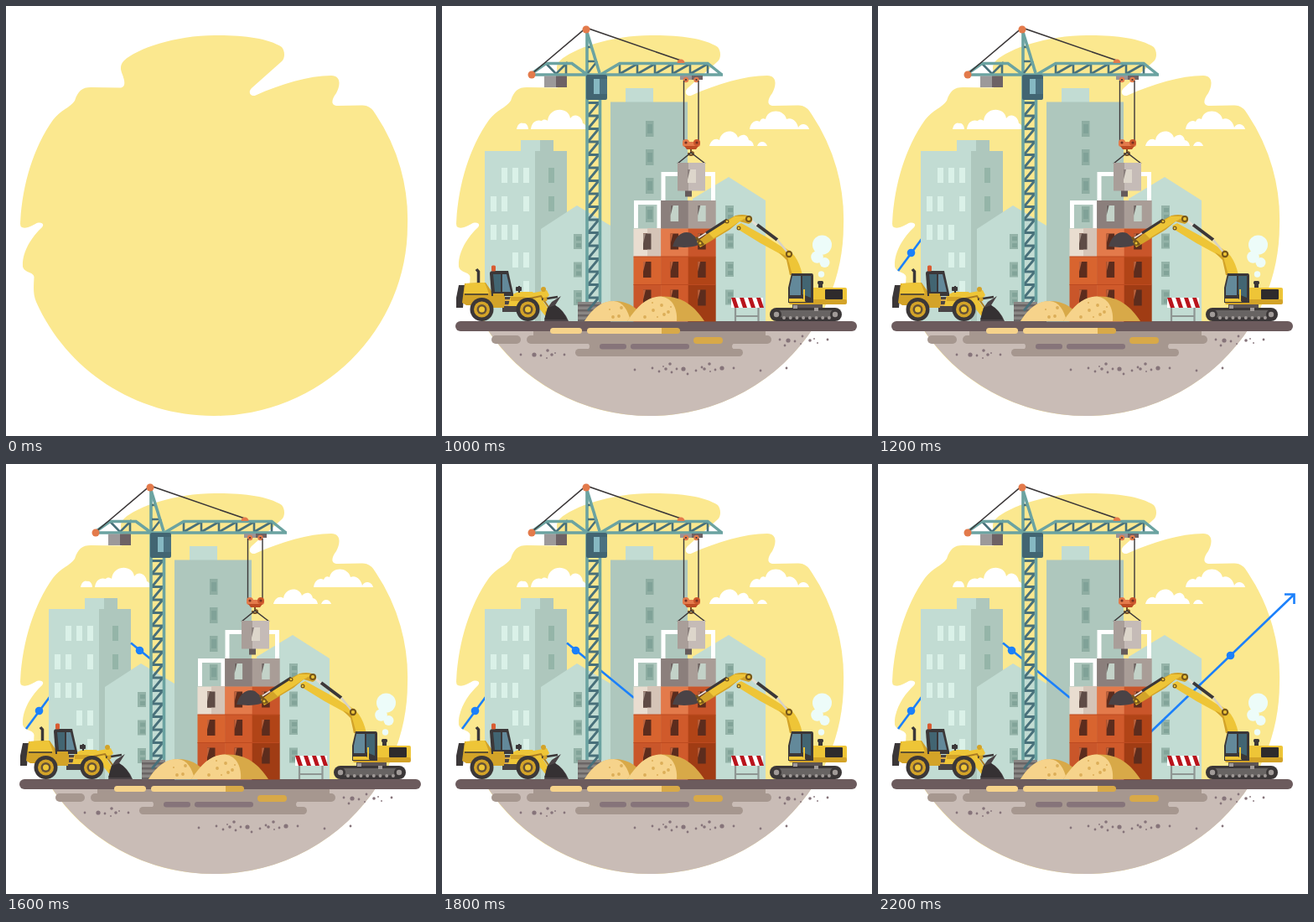
These frames come from a looping animation (513 px wide and 513 px high, 2400 ms). An HTML page:

```html
<!DOCTYPE html>
<html lang="en">
<head>
<meta charset="utf-8">
<title>Construction site</title>
<style>
html, body { margin: 0; width: 100%; height: 100%; overflow: hidden; background: #fff; }
svg { display: block; width: 100%; height: 100%; }
</style>
</head>
<body>
<svg id="stage" viewBox="0 0 513 513"></svg>
<script>
const LOOP = 2400;
const rect = (x, y, w, h, fill, r = 0) =>
  `<rect x="${x}" y="${y}" width="${w}" height="${h}" rx="${r}" fill="${fill}"/>`;
const shape = (d, fill) => `<path d="${d}" fill="${fill}"/>`;
const line = (d, color, w = 2, cap = 'butt') =>
  `<path d="${d}" fill="none" stroke="${color}" stroke-width="${w}" stroke-linecap="${cap}"/>`;
const disc = (x, y, r, fill) => `<circle cx="${x}" cy="${y}" r="${r}" fill="${fill}"/>`;
const step = (at, ...parts) => `<g data-at="${at}">${parts.join('')}</g>`;
const repeat = (n, draw) => Array.from({ length: n }, (_, i) => draw(i)).join('');
const dots = (r, fill, places) =>
  line(places.map(([x, y]) => `M${x} ${y}h.01`).join(''), fill, 2 * r, 'round');

const teal = '#6ba3a1', slate = '#48707a', pale = '#c2dcd3', sage = '#aec7bd';
const yellow = '#fbe88f', amber = '#d8a948', sand = '#f6d38b', gold = '#eec537', ochre = '#d3a328';
const dark = '#3b3738', grey = '#a6978f', mauve = '#86747a', orange = '#e37a4b', blue = '#1b80fb';
const glass = '#63899a', shade = '#426572';

const backdrop = () => shape(`M249 35C283 35 312 38 329 49C333 54 333 62 329 66L293 98
  C288 103 292 109 298 106.500C328 93 361 83 388 83C400 83 399 95 394 104C388 112 387 119 396 119
  L424 118.500C432 118 437 122 441.500 130A231 227 0 0 1 479 262A231 227 0 0 1 248 489
  C154 489 72 434 36 353C32 344 33 334 33.500 324C34 317 22 319 20 311C19 294 30 276 43 264
  C47 259 40 257 35 260C29 263 24 266 19 264Q17 263 17 260C19 215 32 170 56 136
  C65 124 77 121 82 113C86 101 91 97 101 97L136 97.500C143 97 142 90 139 82
  C136 75 136 70 141 65C156 51 202 35 249 35Z`, yellow);

const ground = () => [
  shape('M51 381H445A231.500 227.500 0 0 1 51 381Z', '#c9bcb6'),
  rect(59, 393, 35, 10, grey, 5), rect(109, 386, 277, 9, grey, 2), rect(101, 393, 292, 10, grey, 5),
  shape('M173 402H350Q346 403 346 406T350 410H173Q176 409 176 406T173 402Z', grey),
  rect(159, 409, 200, 9, grey, 4.5),
  rect(188, 403, 32, 6.5, mauve, 3.2), rect(225, 403, 70, 6.5, mauve, 3.2),
  rect(300, 395, 35, 8, amber, 4),
  rect(16, 376, 479, 12, '#6c5b5d', 6),
  rect(129, 384, 38, 7, sand, 3.5), rect(240, 384, 44, 7, amber, 3.5),
  rect(173, 384, 30, 7, sand, 3.5), rect(178, 384, 84, 7, sand),
  dots(2.6, mauve, [[110, 416], [413, 399], [288, 433], [334, 432]]),
  dots(1.8, mauve, [[131, 416], [439, 399], [267, 433], [313, 433], [126, 411], [272, 427], [319, 427]]),
  dots(1.4, mauve, [[94, 416], [118, 417], [146, 416], [403, 398], [421, 400], [430, 394], [409, 405],
    [460, 398], [230, 434], [251, 432], [259, 436], [293, 439], [303, 435], [326, 434], [348, 432],
    [380, 435], [411, 432], [274, 437], [280, 433], [310, 431]]),
  dots(.9, mauve, [[125, 420], [135, 414], [428, 403], [444, 397], [448, 402], [264, 430], [320, 436]])
].join('');

const clouds = () => [
  'M89 147C90 141 94 138 97 140C100 139 103 143 103 147Z',
  'M106 147C107 138 113 135 119 137C122 134 125 136 126 137C128 120 151 120 153 134C158 127 167 131 168 140Q172 141 172 147Z',
  'M367 147C368 139 374 135 379 138C381 133 384 134 386 135C389 122 408 123 411 135C418 132 424 139 425 145C428 139 436 140 438 147Z',
  'M319 167C321 160 326 157 331 160C333 147 350 146 353 157C359 151 365 154 366 160Q371 161 372 167Z',
  'M376 167Q378 162 382 162T388 167Z'
].map(d => shape(d, '#fff')).join('');

const paleWindow = (x, y) =>
  rect(x, y, 10, 18, '#94b3a8') + rect(x + 3, y + 3, 6, 5, '#82a499') + rect(x + 3, y + 11, 6, 5, '#82a499');

const city = () => [
  rect(94, 160, 23, 14, pale), rect(117, 160, 16, 14, sage),
  rect(51, 173, 60, 203, pale), rect(111, 173, 38, 203, sage),
  [[71, 193], [84, 193], [97, 193], [58, 227], [71, 227], [97, 227], [58, 261], [71, 261], [84, 261],
    [84, 294], [97, 294], [97, 328]].map(([x, y]) => rect(x, y, 7, 18, '#daf1e8')).join(''),
  repeat(2, i => rect(127, 193 + i * 34, 7, 18, '#94b5a8')),
  rect(219, 98, 33, 17, pale), rect(201, 114.5, 92, 262, sage),
  repeat(4, i => rect(243, 137 + i * 34, 9.5, 19, '#8eada2') + rect(245, 141 + i * 34, 6, 11, '#80a298')),
  shape('M118 266L161 238L201 262V376H118Z', pale),
  shape('M299 230L342 204L386 232V376H299Z', pale),
  repeat(3, i => paleWindow(157, 272 + i * 33.5)),
  repeat(4, i => paleWindow(338, 238 + i * 33.5))
].join('');

const blockWindow = (x, y, fill, glow) =>
  rect(x, y, 9.5, 19, fill) + shape(`M${x} ${y}h3l-3 12Z`, glow);

const blocks = () => {
  const rows = [
    [null, '#8b7f7c', '#a99d97'],
    ['#e9ddd0', orange, '#c9552a'],
    ['#d8642f', '#d05a2b', '#b14417'],
    ['#c9562a', '#d05a2b', '#a03c14']
  ];
  return line('M231.500 265V234.500H259V265M264 232V200.500H323.500V232', '#fff', 5) +
    rows.map((row, j) => row.map((fill, i) => {
      if (!fill) return '';
      const x = 228.5 + i * 32.6, y = 232 + j * 33.5;
      return rect(x, y, 33, j === 3 ? 44 : 33.8, fill) +
        blockWindow(x + 11.5, y + 6, j ? '#5c2c1d' : '#c3d2c8', j ? '#bd613c' : '#6f6361');
    }).join('')).join('') +
    rect(245, 265, 16, 33.5, '#d5c4b7') + blockWindow(240, 271.5, '#5e4b45', '#a18f85') +
    line('M228.500 299H326M228.500 332.500H326', '#bd4a20', 1);
};

const crane = () => [
  rect(162, 353, 28, 23, '#898684'), repeat(4, i => rect(162, 356 + i * 6, 28, 2.5, '#6a6565')),
  repeat(16, i => {
    const y = 115.5 + i * 15.5;
    return line(`M174 ${y}H187M174 ${y + 15.5}L187 ${y}`, slate, 2.8);
  }),
  line('M173 30V353M188.500 80V353', teal, 3.6),
  line('M174 49H179M174 66H185M174 80L185 66', slate, 2.5),
  line('M172 28L188 80', teal, 3.6),
  line('M124 68.500L136 81L148 69V81', slate, 2.6),
  repeat(5, i => line(`M${212 + i * 21} 81V69M${212 + i * 21} 81L${233 + i * 21} 69`, slate, 2.6)),
  line('M317 69V81', slate, 2.6),
  line('M105 82L124 68.500H155L172 81M189 82L212 68.500H317L334 82M105 82H335', teal, 3.5),
  line('M107 81L172 26L285 65', dark, 1.6),
  shape('M280.500 68A4.500 4.500 0 0 1 289.500 68Z', orange),
  disc(107, 82, 4.5, orange), disc(172, 28, 4.5, orange),
  rect(122, 83.5, 14, 13.5, '#9c999a'), rect(136, 83.5, 13, 13.5, '#6d6265'),
  rect(172, 82, 25, 30, shade, 2), rect(181, 87, 7, 18, '#86b8c2'), rect(188, 87, 9, 18, '#4b7180'),
  rect(284, 83, 14, 5, '#999496'), rect(298, 83, 13, 5, '#6d6265'),
  disc(291, 88, 3.2, orange), disc(303.500, 88, 3.2, orange), disc(291, 88, 1.1, dark), disc(303.500, 88, 1.1, dark),
  line('M288.500 89V163M306 89V163', dark, 1.4),
  rect(287, 162, 21, 6, orange, 3), disc(291, 163, 4, orange), disc(304, 163, 4, '#cb562b'),
  shape('M289 167H306L303 171H292Z', '#bd4c23'), disc(291, 163, 1.6, '#773020'), disc(304, 163, 1.6, '#773020'),
  line('M297 171V174C301 174 301 178 297 178Q294 178 294 175', '#795126', 2),
  line('M281 188L297 175L314 188', dark, 1.5),
  rect(290, 218, 8, 9.5, '#655b5b'), rect(281, 187, 13, 33.5, '#a99e99'), rect(294, 187, 20, 33.5, '#c5bbb7'),
  rect(293, 195, 10, 16, '#ddd6cb'), shape('M293 195H296L293 207Z', '#8b807d')
].join('');

const piles = () => [
  shape('M170 376C181 359 191 352 207 352C226 353 237 364 243 376Z', amber),
  shape('M170 376C181 359 191 352 205 352C216 353 222 363 225 376Z', sand),
  shape('M221 376C235 355 246 347 263 346.500C287 346 301 358 313 376Z', amber),
  shape('M221 376C235 355 246 347 261 346.500C276 348 281 363 280 376Z', sand),
  dots(1.9, '#dcae58', [[204, 371], [211, 370], [214, 360], [252, 363], [262, 357], [265, 368], [242, 371], [270, 365]]),
  dots(1, '#dcae58', [[251, 354], [257, 371], [273, 359], [200, 362]])
].join('');

const wheel = (x, y) =>
  disc(x, y, 14, dark) + disc(x, y, 9.5, ochre) + disc(x, y, 6, '#655137') + disc(x, y, 3.5, gold);

const loader = () => [
  line('M43.500 331V317L41 314', dark, 3.5),
  rect(72, 347, 20, 18, '#4a4445'), rect(73, 350, 13, 2, amber), rect(73, 356, 13, 2, amber),
  shape('M20 333H27L25 360H17V348Z', dark),
  shape('M27 331L52 330L61 343H75V357H29L24 354Z', ochre),
  shape('M28 331L51 330L56 343H26Z', gold),
  line('M27 344H55', '#5f5130', 2),
  shape('M82 345L91 341H108L119 354L114 358H79Z', gold),
  shape('M82 347H108L112 352H82Z', ochre),
  shape('M57 319Q57 316 61 316H79L85 343V346H59Z', dark),
  shape('M61 320H70V341H63Z', shade), shape('M72 320H77L82 341H72Z', glass),
  rect(59, 309.5, 5, 7, '#d95b31', 1.5),
  rect(61, 343, 13, 17, ochre), rect(91, 334, 2, 8, dark), rect(88, 335, 7, 5, dark, 1),
  shape('M93 345L115 341L125 339L128 345L121 353L131 368L125 372L109 352Z', gold),
  line('M99 350L118 346L129 362', '#a97b23', 2),
  line('M119 350L138 347', dark, 2.5),
  disc(121, 338, 3, ochre), disc(123, 350, 2.5, ochre), disc(126, 366, 3, ochre),
  shape('M142 346L135 357Q145 362 151 376H122L126 360L131 353Z', '#4a4346'),
  shape('M126 360L135 357Q145 364 149 374H122Z', '#353133'),
  wheel(47.500, 362), wheel(102.500, 362)
].join('');

const barrier = () => [
  line('M350 359V376M377.500 359V376M350 370H378', '#8e9693', 2.2),
  rect(345, 348, 38, 12, '#fff'),
  repeat(4, i => shape(`M${345 + i * 10} 348h5l4 12h-5Z`, '#b9141c'))
].join('');

const excavator = () => [
  disc(453.500, 285, 11.5, '#edfcf9'), disc(447.500, 299.500, 7.3, '#edfcf9'), disc(456.500, 306, 6, '#edfcf9'), disc(452.500, 320, 3.7, '#edfcf9'),
  shape('M275 287C278 275 287 267 297 271L304 277L306 285C296 289 285 288 275 287Z', '#4a4346'),
  shape('M351 262L357 259L386 275L405 287Q424 293 430 321H415L413 303L402 295L380 283L354 267Z', gold),
  shape('M402 294L412 299L418 321H415L411 303Z', ochre),
  line('M367 254L378 264', '#e4dfd5', 3), line('M376 261L400 279', dark, 4), line('M400 279L414 296', '#d6d1c7', 2.5),
  shape('M304 281L337 257L350 250Q363 247 370 253Q371 258 366 260L355 257L343 267L308 288Z', ochre),
  shape('M318 271L349 251H366L355 257L343 265L324 277Z', gold),
  line('M304 278L318 269', '#e4dfd5', 2), line('M315 271L340 255', dark, 3.2),
  line('M303 276L312 285', '#76551e', 3),
  [[366, 254, 4], [340, 257, 2.5], [354, 265, 2.5], [308, 283, 3], [414, 296, 4.2]]
    .map(([x, y, r]) => disc(x, y, r, '#765619') + disc(x, y, r / 2, gold)).join(''),
  rect(418, 356, 36, 7, '#5d5554'),
  rect(391, 360, 86, 16, dark, 8), rect(394, 363, 80, 10, '#686463', 5),
  line('M400 373H470', dark, 3),
  repeat(8, i => disc(408 + i * 7.7, 372, 2, '#a09a98')),
  [399, 469].map(x => disc(x, 368, 6, dark) + disc(x, 368, 3.2, '#a09a98')).join(''),
  rect(449, 330, 5, 7, dark), rect(448, 328, 7, 4, dark, 1.5),
  rect(440, 336, 43, 17, gold, 2), rect(414, 350, 69, 6, ochre, 2),
  rect(457, 338, 21, 12, '#2e2b2c', 1),
  shape('M417 319H441Q443 319 443 322V354H413V336Z', dark),
  shape('M418 322H428V345H415V336Z', glass), shape('M430 322H440V348L430 344Z', shade),
  shape('M414 349H430L434 353H414Z', gold), rect(431, 338, 2, 15, gold),
  rect(419, 357, 5, 4, '#a09a98'), rect(444, 360, 5, 4, '#a09a98')
].join('');

const trend = d => line(d, blue, 2.6);
const stage = document.getElementById('stage');
stage.innerHTML = [
  step(0, backdrop()),
  step(500, ground()),
  step(1000, clouds()),
  step(1200, trend('M24 316L55 274'), disc(39.500, 294.500, 4.8, blue)),
  step(1000, city()),
  step(1400, trend('M149 213.500L173 233')),
  step(1600, disc(159.500, 222.500, 4.8, blue)),
  step(1800, trend('M187 244.500L229 279')),
  step(2000, trend('M325 320L496 156'), disc(420.500, 228.500, 4.8, blue)),
  step(2200, trend('M485 155.500H496.500V167')),
  step(1000, blocks(), crane(), piles(), loader(), barrier(), excavator())
].join('');

const steps = [...stage.children];
function render() {
  const time = performance.now() % LOOP;
  for (const g of steps) g.style.display = time >= +g.dataset.at ? '' : 'none';
  requestAnimationFrame(render);
}
render();
</script>
</body>
</html>
```
